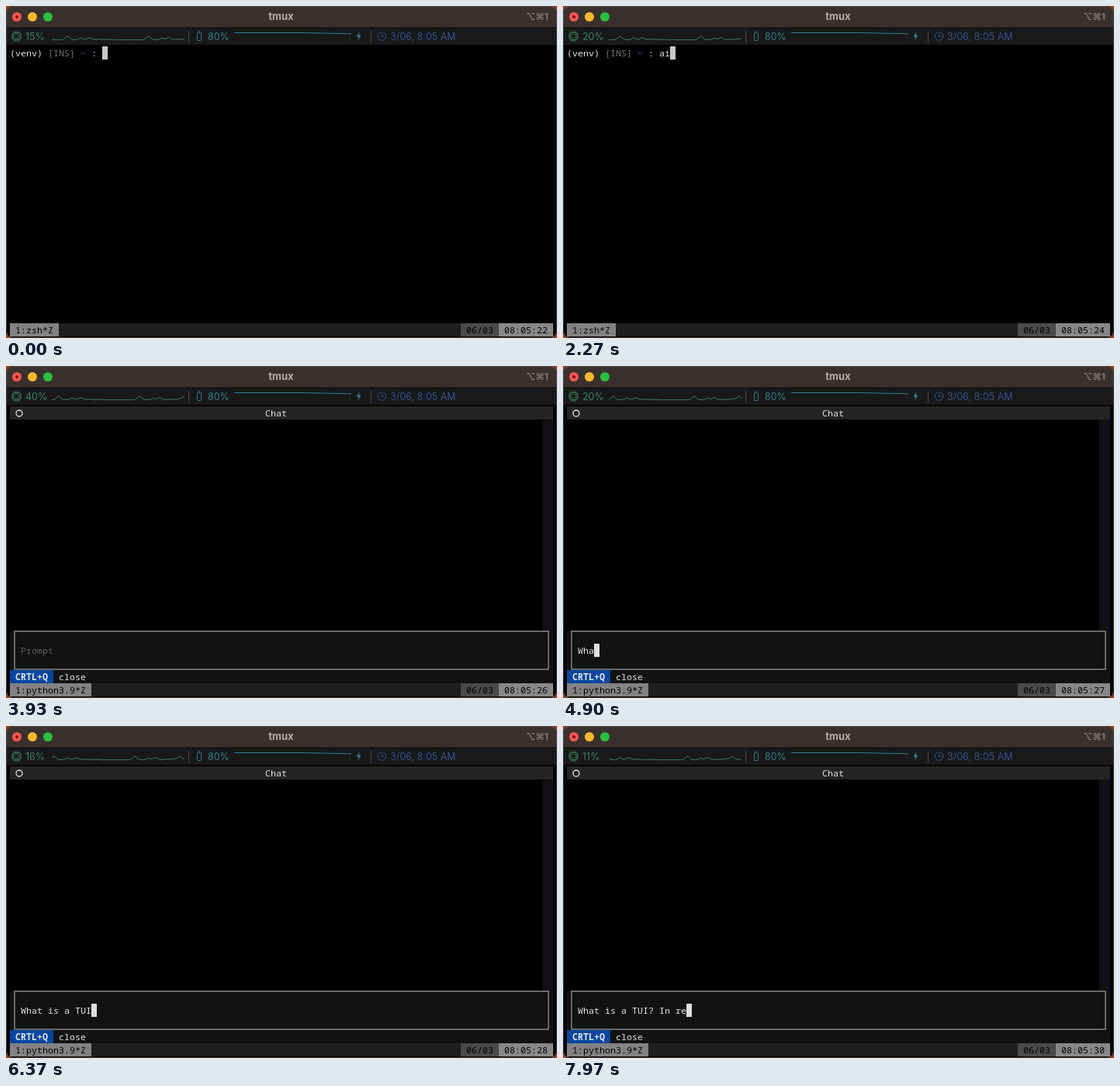
Animation of 710x428 px, one loop 8000 ms. Source, as an HTML page:

```html
<!DOCTYPE html>
<html lang="en">
<head>
<meta charset="utf-8">
<title>Terminal chat</title>
<style>
html, body { margin: 0; width: 100%; height: 100%; overflow: hidden; background: #000; }
svg { display: block; width: 710px; height: 428px; }
text { white-space: pre; }
.mono { font: 11.667px "Noto Sans Mono", "DejaVu Sans Mono", monospace; fill: #e4e4e4; }
.ui { font: 12.5px Inter, Roboto, sans-serif; }
.cpu { color: #3c8060; }
.battery { color: #2f7f8c; }
.date { color: #34518c; }
.line { fill: none; stroke: currentColor; }
</style>
</head>
<body>
<svg viewBox="0 0 710 428">
  <rect width="710" height="428" fill="#b23a1c"/>
  <clipPath id="window"><rect width="710" height="428" rx="9"/></clipPath>
  <g clip-path="url(#window)">
    <rect width="710" height="428"/>
    <rect width="710" height="28" fill="#3a302d"/>
    <rect y="28" width="710" height="22" fill="#191919"/>
    <rect y="27.5" width="710" height="1" fill="#0c0a0a"/>
  </g>
  <rect x=".5" y=".5" width="709" height="427" rx="9" fill="none" stroke="#5c5452" stroke-opacity=".75"/>

  <!-- title bar -->
  <circle cx="14" cy="14" r="6" fill="#fe5850"/><circle cx="14" cy="14" r="2" fill="#7a0a08"/>
  <circle cx="34" cy="14" r="6" fill="#fdb92c"/>
  <circle cx="54" cy="14" r="6" fill="#28c03c"/>
  <text class="ui" x="354.5" y="18" text-anchor="middle" font-weight="700" style="font-weight:700;font-size:13px" fill="#b6aeab">tmux</text>
  <text x="699" y="17.5" text-anchor="end" style="font:bold 12px Inter,'DejaVu Sans',sans-serif" fill="#80776f">⌥⌘1</text>

  <!-- system bar -->
  <g class="cpu">
    <rect class="line" x="9" y="34.5" width="9" height="9" rx="1"/>
    <rect class="line" x="11" y="36.5" width="5" height="5" stroke-opacity=".6"/>
    <path class="line" stroke-opacity=".8" d="M10.5 32v2m2-2v2m2-2v2m2-2v2M10.5 44v2m2-2v2m2-2v2m2-2v2M7 36h2m-2 2h2m-2 2h2m-2 2h2M18 36h2m-2 2h2m-2 2h2m-2 2h2"/>
    <text class="ui" id="load" x="25" y="43.5" fill="currentColor"></text>
    <polyline class="line" id="graph"/>
  </g>
  <path d="M235.5 32v15M470.5 32v15" stroke="#484d4d"/>
  <g class="battery">
    <rect class="line" x="246.5" y="34.5" width="5" height="10" rx="1"/>
    <path class="line" d="M247.5 32.7h3"/>
    <text class="ui" x="260" y="43.5" fill="currentColor">80%</text>
    <path class="line" d="M294 34.5H382L445 35.8"/>
    <path class="line" d="M443.5 36v9" stroke-opacity=".25"/>
    <path d="M455.5 33L451.5 39.8H454L453 45L457.5 38H455Z" fill="currentColor"/>
  </g>
  <g class="date">
    <circle class="line" cx="484.5" cy="39" r="5.3"/>
    <path class="line" d="M484.5 35.5V39.5H487.5"/>
    <text class="ui" x="495" y="43.5" fill="currentColor">3/06, 8:05 AM</text>
  </g>

  <g class="mono" id="shell">
    <text x="5" y="65">(venv) <tspan fill="#707070">[INS]</tspan> <tspan fill="#2d70b8">~</tspan> : <tspan id="command"></tspan></text>
    <rect id="shellCursor" width="7" height="17" fill="#c8c8c8"/>
  </g>

  <g class="mono" id="chat">
    <rect x="5" y="52" width="700" height="17" fill="#242424"/>
    <circle cx="17" cy="61" r="4" fill="none" stroke="#e4e4e4" stroke-width="1.3"/>
    <text x="334" y="65">Chat</text>
    <rect x="691" y="69" width="14" height="272" fill="#101116"/>
    <rect x="5" y="341" width="700" height="68" fill="#121212"/>
    <rect x="11" y="342" width="688" height="49" fill="none" stroke="#777" stroke-width="1.7"/>
    <text id="prompt" x="19" y="371"></text>
    <rect id="chatCursor" y="358" width="7" height="17" fill="#e0e0e0"/>
    <rect x="5" y="392" width="56" height="17" fill="#0646a0"/>
    <text x="12" y="405" font-weight="700">CRTL+Q</text>
    <text x="68" y="405">close</text>
  </g>

  <!-- multiplexer status line -->
  <g class="mono">
    <rect x="5" y="409" width="700" height="17" fill="#1f1f1f"/>
    <rect id="tab" x="5" y="409" height="17" fill="#828282"/>
    <rect x="586" y="409" width="49" height="17" fill="#4b4b4b"/>
    <rect x="635" y="409" width="70" height="17" fill="#888"/>
    <g fill="#000">
      <text id="tabName" x="12" y="422"></text>
      <text x="593" y="422">06/03</text>
      <text id="clock" x="642" y="422"></text>
    </g>
  </g>
</svg>
<script>
const LOOP = 8000, CELL = 7, POINTS = 60, STEP = 171 / 59;
const FIRST_TICK = 750;
const LAUNCH = 2350, CHAT_OPEN = 3500;
const loads = [15, 17, 20, 25, 40, 20, 16, 13, 11];
const bumps = [[7, 29], [13, 15], [17, 17], [21, 6], [26, 4], [43, 28], [49, 12], [52, 19], [57, 5]];
const command = { text: "ai", times: [1020, 1230] };
const question = {
  text: "What is a TUI? In re",
  times: [4530, 4680, 4820, 4960, 5070, 5200, 5320, 5430, 5550, 5670,
          5880, 6050, 6210, 6740, 6960, 7130, 7320, 7470, 7650, 7820]
};

const el = Object.fromEntries([...document.querySelectorAll("[id]")].map(e => [e.id, e]));
const typed = (line, t) => line.text.slice(0, line.times.filter(at => at <= t).length);
const show = (node, on) => node.setAttribute("visibility", on ? "visible" : "hidden");
const place = (node, attrs) => Object.entries(attrs).forEach(([k, v]) => node.setAttribute(k, v));
const write = (node, text) => { if (node.textContent !== text) node.textContent = text; };

function loadAt(i) {
  if (i >= POINTS - 1) return loads[i - POINTS + 1];
  return bumps.reduce((sum, [at, height]) => sum + height * Math.exp(-((i - at) ** 2) / 1.5),
    10 + Math.sin(i * 2.1));
}

function graphPoints(tick) {
  return Array.from({ length: POINTS }, (_, i) =>
    `${(59 + i * STEP).toFixed(2)},${(45.2 - 0.165 * loadAt(i + tick)).toFixed(2)}`).join(" ");
}

function render(t) {
  const tick = t < FIRST_TICK ? 0 : 1 + Math.floor((t - FIRST_TICK) / 1000);
  write(el.load, loads[tick] + "%");
  write(el.clock, "08:05:" + (22 + tick));
  el.graph.setAttribute("points", graphPoints(tick));

  const launched = t >= LAUNCH, chatting = t >= CHAT_OPEN;
  const name = launched ? "1:python3.9*Z" : "1:zsh*Z";
  write(el.tabName, name);
  el.tab.setAttribute("width", (name.length + 2) * CELL);
  show(el.shell, !chatting);
  show(el.chat, chatting);

  const cmd = typed(command, t);
  write(el.command, cmd);
  place(el.shellCursor, launched ? { x: 5, y: 69 } : { x: 124 + cmd.length * CELL, y: 52 });

  const ask = typed(question, t);
  write(el.prompt, ask || "Prompt");
  el.prompt.setAttribute("fill", ask ? "#e4e4e4" : "#5e5e5e");
  el.chatCursor.setAttribute("x", 19 + ask.length * CELL);
  show(el.chatCursor, chatting && ask);
}

const start = performance.now();
function frame() {
  render((performance.now() - start) % LOOP);
  requestAnimationFrame(frame);
}
render(0);
requestAnimationFrame(frame);
</script>
</body>
</html>
```
